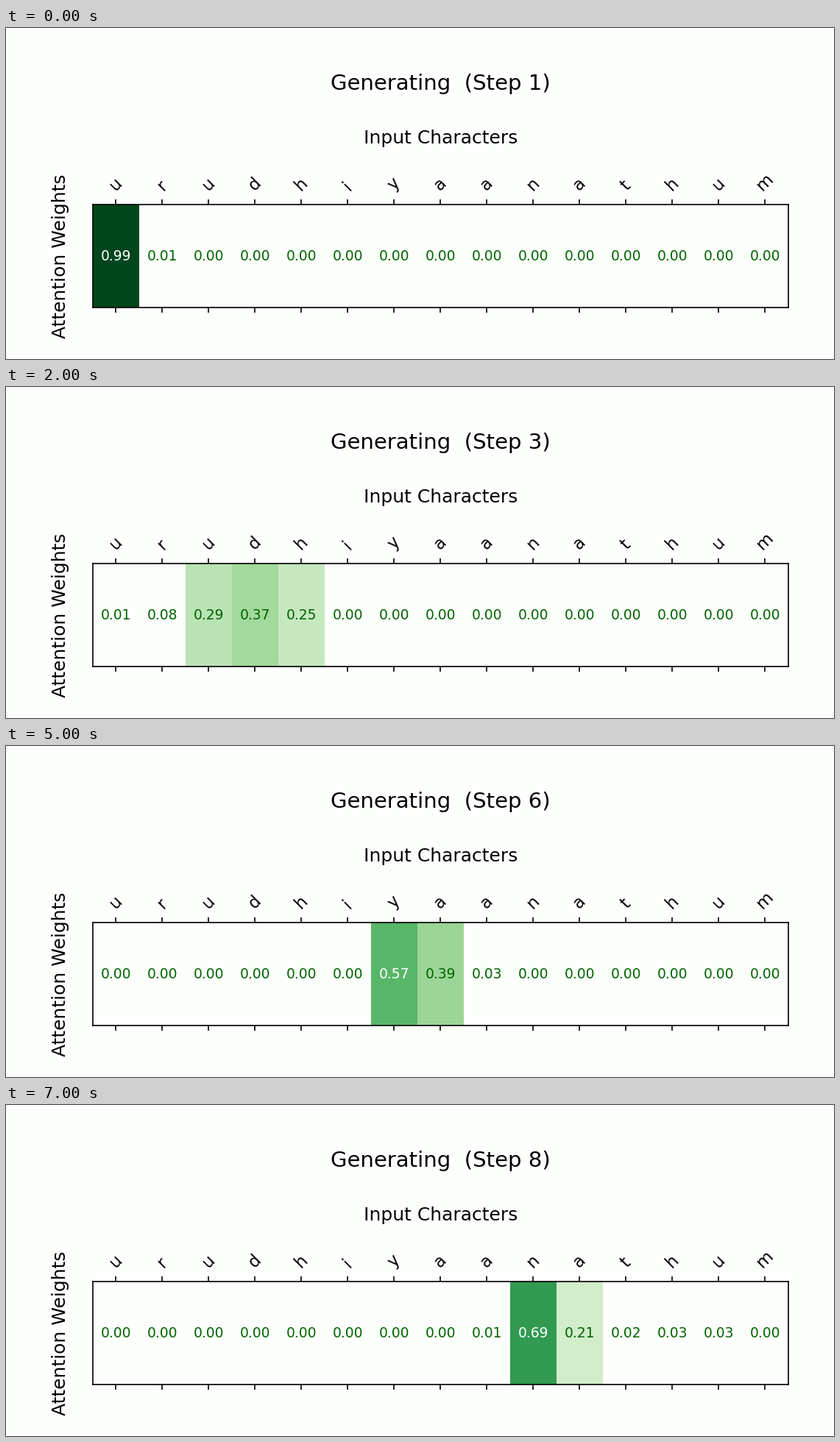
A matplotlib script for the animation above (8 s loop, 1125 px wide and 450 px high).

```python
import numpy as np
import matplotlib.pyplot as plt
from matplotlib.animation import FuncAnimation

W, H, DPI = 1125, 450, 150
BG = "#fdfffc"
CHARS = "urudhiyaanathum"
VISIBLE = 0.1   # weights up to this stay uncoloured
LIGHT = 0.5     # weights above this get white text

# For each step: index of the first non-zero weight, then the run of weights
STEPS = [
    (0, [0.99, 0.01]),
    (0, [0.01, 0.38, 0.10, 0.30, 0.20]),
    (0, [0.01, 0.08, 0.29, 0.37, 0.25]),
    (3, [0.42, 0.55, 0.02]),
    (5, [0.62, 0.35, 0.03]),
    (6, [0.57, 0.39, 0.03]),
    (7, [0.04, 0.63, 0.21, 0.01, 0.02, 0.07, 0.01]),
    (8, [0.01, 0.69, 0.21, 0.02, 0.03, 0.03]),
]

plt.rcParams["font.family"] = "DejaVu Sans"


def weights(step):
    start, run = STEPS[step]
    row = np.zeros(len(CHARS))
    row[start:start + len(run)] = run
    return row


def shaded(row):
    return np.ma.masked_less_equal(row[np.newaxis, :], VISIBLE)


fig = plt.figure(figsize=(W / DPI, H / DPI), dpi=DPI, facecolor=BG)
ax = fig.add_axes([117.75 / W, 70 / H, 945 / W, 140 / H], facecolor=BG)

image = ax.imshow(shaded(weights(0)), cmap="Greens", vmin=0, vmax=1,
                  aspect="auto", interpolation="nearest")
ax.set_xticks(range(len(CHARS)), list(CHARS), rotation=45, fontsize=11)
ax.tick_params(axis="x", top=True, bottom=True, labeltop=True, labelbottom=False)
ax.set_yticks([])
ax.set_ylabel("Attention Weights", fontsize=12, labelpad=15)

center = 590.25 / W
fig.text(center, (H - 157) / H, "Input Characters", fontsize=12,
         ha="center", va="baseline")
title = fig.text(center, (H - 84) / H, "", fontsize=14,
                 ha="center", va="baseline")
labels = [ax.text(i, 0, "", fontsize=9, ha="center", va="center")
          for i in range(len(CHARS))]


def update(step):
    row = weights(step)
    image.set_data(shaded(row))
    title.set_text(f"Generating  (Step {step + 1})")
    for label, value in zip(labels, row):
        label.set_text(f"{value:.2f}")
        label.set_color("white" if value > LIGHT else "darkgreen")
    return [image, title, *labels]


anim = FuncAnimation(fig, update, frames=len(STEPS), interval=1000,
                     init_func=lambda: update(0), repeat=True, repeat_delay=0)
plt.show()
```
